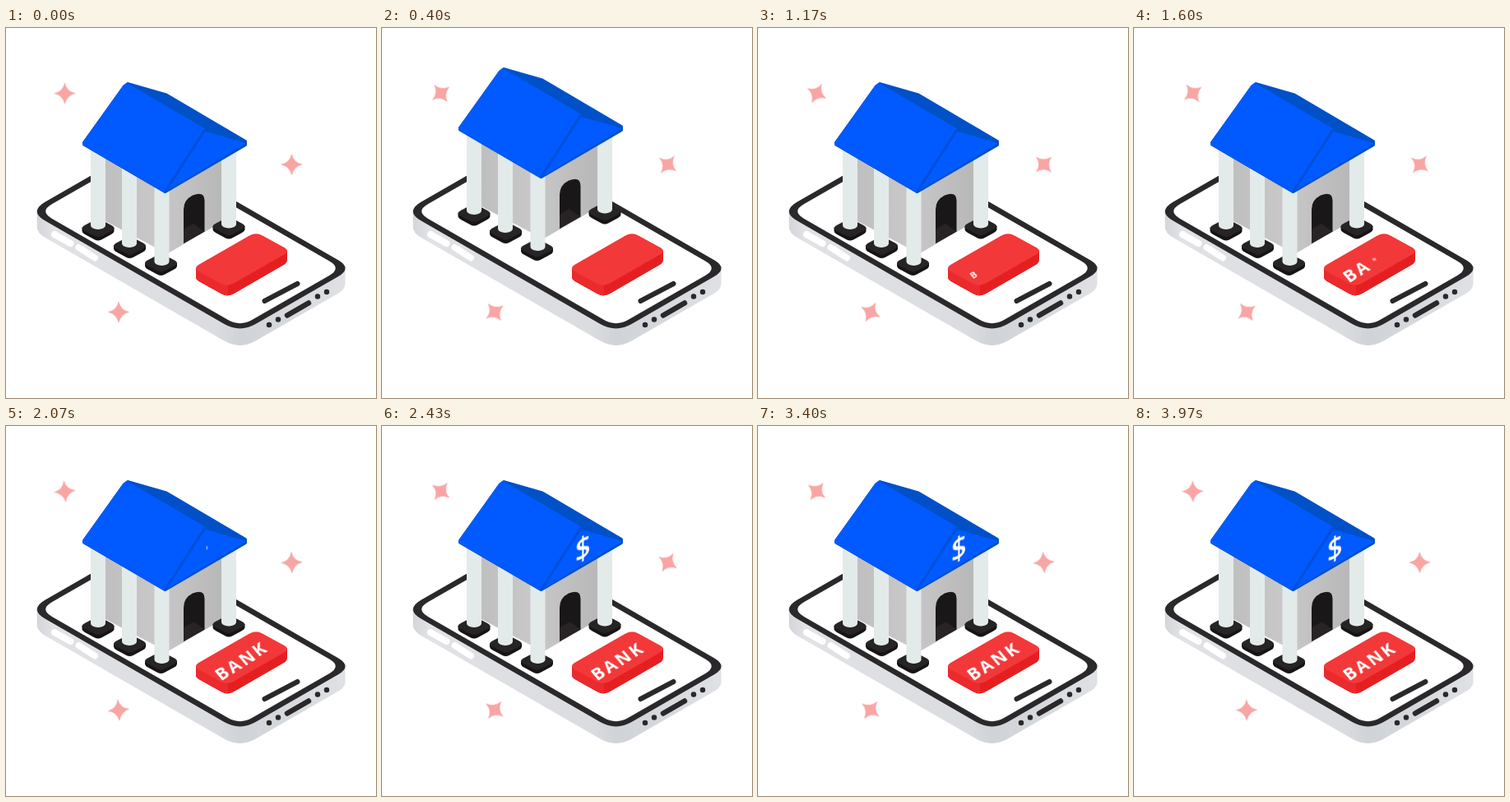
These frames come from a looping animation (450 px wide and 450 px high, 4000 ms). An HTML page:

```html
<!DOCTYPE html>
<html lang="en">
<head>
<meta charset="utf-8">
<title>Mobile bank</title>
<style>
  html, body { margin: 0; width: 100%; height: 100%; overflow: hidden; background: #fff; }
  svg { display: block; width: 100vw; height: 100vh; }
  text { font-family: "Open Sans", "Noto Sans", sans-serif; fill: #fff; text-anchor: middle; }

  .bank, .star, .pop {
    animation: 4s cubic-bezier(.3333, 0, .6667, 1) infinite;
    transform-origin: 0 0;
  }
  .bank { animation-name: hop; }
  .star { animation-name: spin; animation-duration: 1s; animation-direction: alternate; --turn: -360deg; }
  .slow { --turn: -146deg; }

  .b { animation-name: pop-b; }
  .a { animation-name: pop-a; }
  .n { animation-name: pop-n; }
  .k { animation-name: pop-k; }
  .dollar { animation-name: pop-dollar; }

  @keyframes hop {
    0%, 25%, 100% { transform: translateY(0); }
    12.5% { transform: translateY(-20px); }
  }
  @keyframes spin { from { transform: rotate(0deg); } to { transform: rotate(var(--turn)); } }

  /* each glyph starts 250 ms after the last and grows for a third of a second */
  @keyframes pop-b { 0%, 25% { transform: scale(0); } 33.33%, 100% { transform: scale(1); } }
  @keyframes pop-a { 0%, 31.25% { transform: scale(0); } 39.58%, 100% { transform: scale(1); } }
  @keyframes pop-n { 0%, 37.5% { transform: scale(0); } 45.83%, 100% { transform: scale(1); } }
  @keyframes pop-k { 0%, 43.75% { transform: scale(0); } 52.08%, 100% { transform: scale(1); } }
  @keyframes pop-dollar { 0%, 50% { transform: scale(0); } 58.33%, 100% { transform: scale(1); } }
</style>
</head>
<body>
<svg viewBox="0 0 450 450">
  <defs>
    <linearGradient id="side" gradientUnits="userSpaceOnUse" x1="38" y1="0" x2="413" y2="0">
      <stop offset="0" stop-color="#d3d5d9"/>
      <stop offset=".05" stop-color="#e1e2e5"/>
      <stop offset=".58" stop-color="#dbdce0"/>
      <stop offset=".655" stop-color="#d0d3d8"/>
      <stop offset=".75" stop-color="#d3d6da"/>
      <stop offset="1" stop-color="#dfe1e4"/>
    </linearGradient>
    <linearGradient id="wall">
      <stop offset="0" stop-color="#bdbdbd"/>
      <stop offset="1" stop-color="#cacaca"/>
    </linearGradient>
    <linearGradient id="front">
      <stop offset="0" stop-color="#c6c6c6"/>
      <stop offset="1" stop-color="#b4b4b4"/>
    </linearGradient>
    <path id="star" d="M0-13.5Q2.2-2.2 13.5 0Q2.2 2.2 0 13.5Q-2.2 2.2-13.5 0Q-2.2-2.2 0-13.5Z" fill="#f9a5a4"/>
    <g id="foot">
      <path d="M-19.5 0V4Q-19.5 6-16 8L-4 14.5Q0 16.5 4 14.5L16 8Q19.5 6 19.5 4V0Z" fill="#161415"/>
      <path d="M-16-3.2Q-23 .5-16 4L-4 10Q0 12 4 10L16 4Q23 .5 16-3.2L4-9.5Q0-11.5-4-9.5Z" fill="#272425"/>
    </g>
    <path id="shaft" d="M-9-92V0A9 5 0 0 0 9 0V-92Z" fill="#e3eaea"/>
  </defs>

  <!-- phone -->
  <path d="M37.7 223V242Q37.7 249 47.7 255L265 380.2Q284.6 391.5 304 380.3L404 322.8Q412.6 317.8 412.6 311V292Z" fill="url(#side)"/>
  <path d="M47.7 211.5Q27.7 223 47.7 234.5L265 359.7Q284.6 371 304 359.8L404 302.3Q421.3 292.3 404 282.3L184 155.6Q164.4 144.3 145 155.5Z" fill="#2a282a"/>
  <path d="M55.7 214.3Q40.7 223 55.7 231.7L269.6 354.8Q284.6 363.5 299.6 354.8L393.3 301Q408.3 292.3 393.3 283.6L180 160.8Q164.4 151.8 149 160.7Z" fill="#fff"/>
  <g fill="none" stroke-linecap="round">
    <path d="M59 251L78.5 262M88.5 267L108 279.5" stroke="#fff" stroke-width="8"/>
    <path d="M314.5 332L354.5 311" stroke="#2a282a" stroke-width="6"/>
    <path d="M342 349.5L368 334.5M320 361h.01M331 354.5h.01M379 326.5h.01M390 321h.01" stroke="#2a282a" stroke-width="6.5"/>
  </g>

  <!-- sign -->
  <path d="M231 292V303Q231 306 235 308.3L262 323.2Q269.5 327.5 277 323.2L338 288Q342 285.5 342 282V271Z" fill="#e51f21"/>
  <path d="M231 292V303Q231 306 235 308.3L262 323.2Q266 325.5 270 325.5V308Z" fill="#ea2a2c"/>
  <path d="M235 287.5Q227 292 235 296.5L261 310.7Q269 315 277 310.5L338 275.6Q346 271 338 266.7L312 252.4Q304 248 296 252.6Z" fill="#f33839"/>
  <g transform="matrix(.848 -.53 .643 .766 285.3 286.3)" font-size="21" font-weight="700">
    <g transform="translate(-27)"><text class="pop b" y="7.5">B</text></g>
    <g transform="translate(-10)"><text class="pop a" y="7.5">A</text></g>
    <g transform="translate(8.7)"><text class="pop n" y="7.5">N</text></g>
    <g transform="translate(27)"><text class="pop k" y="7.5">K</text></g>
  </g>

  <!-- building -->
  <g class="bank">
    <path d="M104 140L197 190V275L104 226Z" fill="url(#wall)"/>
    <path d="M197 190L279.5 140V226L197 274Z" fill="url(#front)"/>
    <path d="M216 262V221Q216 209 227 203.5Q241.5 198 241.5 210V247.5Z" fill="#1a1718"/>
    <path d="M216 262V245L228 238L241.5 247.5Z" fill="#282425"/>
    <use href="#foot" x="112" y="243"/>
    <use href="#shaft" x="112" y="240"/>
    <use href="#foot" x="150.5" y="264.5"/>
    <use href="#shaft" x="150" y="262"/>
    <use href="#foot" x="271" y="241"/>
    <use href="#shaft" x="271" y="238.5"/>
    <use href="#foot" x="188.5" y="285.5"/>
    <use href="#shaft" x="189.5" y="284"/>

    <g stroke-linejoin="round">
      <path d="M148 68L195 81.5L291 138V142L193.5 199L95 141.5V139.5L144 71Z" fill="#0050c8" stroke="#0050c8" stroke-width="4"/>
      <path d="M147 68.5L241 123.5L193 198.5L95 141.5V139.5L144 71Z" fill="#005aff" stroke="#005aff" stroke-width="3"/>
      <path d="M243 127L290 140.500L195 197.500Z" fill="#005aff" stroke="#005aff" stroke-width="2"/>
      <path d="M242 123.500L194 198.500" fill="none" stroke="#0050d8" stroke-width="3" stroke-linecap="round"/>
    </g>
    <g transform="matrix(.866 -.5 0 1 244.3 148.5)">
      <text class="pop dollar" y="13.5" font-size="38" font-weight="600">$</text>
    </g>
  </g>

  <!-- sparkles -->
  <g transform="translate(71.5 79.5)"><use class="star" href="#star"/></g>
  <g transform="translate(347.5 166)"><use class="star slow" href="#star"/></g>
  <g transform="translate(137 345.5)"><use class="star" href="#star"/></g>
</svg>
</body>
</html>
```
